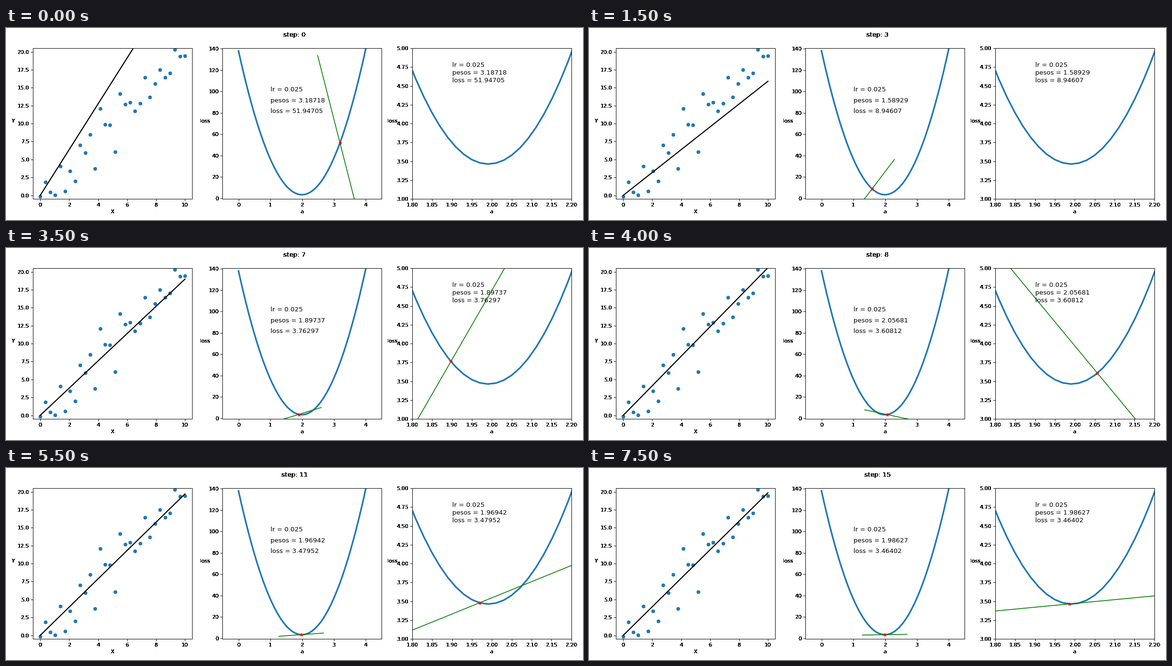
Animation, 1200 px wide and 400 px high, one loop 8000 ms. Source, as a matplotlib script:

```python
import matplotlib.pyplot as plt
import numpy as np
from matplotlib.animation import FuncAnimation

W, H, DPI = 1200, 400, 80
STEPS, INTERVAL = 16, 500

# One-weight linear regression: loss(a) = BASE + CURV * (a - BEST)^2
LR = 0.025
X = np.linspace(0, 10, 30)
Y = np.array([
    -0.17, 1.87, 0.43, 0.03, 4.04, 0.56, 3.37, 1.97, 6.98, 5.91,
    8.46, 3.70, 12.07, 9.86, 9.79, 6.05, 14.14, 12.67, 12.97, 11.73,
    12.80, 16.41, 13.67, 15.54, 17.48, 16.41, 17.02, 20.29, 19.36, 19.42,
])
CURV = np.mean(X ** 2)
BEST, BASE = 1.9914115, 3.463119
START = 1.19576965            # distance from the optimum at step 0
RATE = 1 - 2 * LR * CURV      # factor on that distance per step
REACH = 0.7                   # half width of the tangent


def loss(a):
    return BASE + CURV * (a - BEST) ** 2


def state(step):
    """Weight, loss and the gradient that led to this weight."""
    dist = START * RATE ** step
    a = BEST + dist
    return a, loss(a), 2 * CURV * dist / RATE


def solid_black(image, dpi):
    """Turn every visibly covered pixel into opaque black."""
    out = np.zeros_like(image)
    out[..., 3] = image[..., 3] > 0.12
    return out, 0, 0


def make_axes(left, xlim, ylim, xticks, yticks, xlabel, ylabel):
    ax = fig.add_axes([left / W, 43.9 / H, 331 / W, 314 / H])
    ax.set(xlim=xlim, ylim=ylim, xticks=xticks, yticks=yticks)
    ax.set_xlabel(xlabel)
    ax.set_ylabel(ylabel, rotation=0, labelpad=7.5)
    for part in (ax.xaxis, ax.yaxis, *ax.spines.values()):
        part.set_agg_filter(solid_black)
    return ax


class LossView:
    """Loss curve with its moving tangent, marker and readout."""

    def __init__(self, ax, x, y, gap):
        grid = np.linspace(0, 4, 200)
        ax.plot(grid, loss(grid), lw=3)
        self.tangent, = ax.plot([], [], color="green")
        self.star, = ax.plot([], [], "r*")
        self.texts = [ax.text(x, y - i * gap, "", fontsize=12) for i in range(3)]

    def update(self, a, value, slope):
        ends = np.array([-REACH, REACH])
        self.tangent.set_data(a + ends, value + slope * ends)
        self.star.set_data([a], [value])
        lines = f"lr = {LR}", f"pesos = {a:.5f}", f"loss = {value:.5f}"
        for text, line in zip(self.texts, lines):
            text.set_text(line)


plt.rcParams["font.family"] = "DejaVu Sans"
fig = plt.figure(figsize=(W / DPI, H / DPI), dpi=DPI, facecolor="white")
title = fig.suptitle("step: 0")
title.set_agg_filter(solid_black)

fit_ax = make_axes(56.15, (-0.5, 10.5), (-0.5, 20.5),
                   np.arange(0, 11, 2), np.arange(0, 20.1, 2.5), "X", "Y")
full_ax = make_axes(450.45, (-0.5, 4.5), (-0.5, 140.5),
                    np.arange(5), np.arange(0, 141, 20), "a", "loss")
zoom_ax = make_axes(844.75, (1.8, 2.2), (3, 5),
                    np.linspace(1.8, 2.2, 9), np.linspace(3, 5, 9), "a", "loss")

fit_ax.plot(X, Y, "o")
fit_line, = fit_ax.plot([], [], "k", lw=2)
views = [LossView(full_ax, 1, 100, 10), LossView(zoom_ax, 1.9, 4.75, 0.1)]


def update(step):
    a, value, slope = state(step)
    title.set_text(f"step: {step}")
    fit_line.set_data(X, a * X)
    for view in views:
        view.update(a, value, slope)
    return []


anim = FuncAnimation(fig, update, frames=STEPS, interval=INTERVAL,
                     repeat=True, repeat_delay=0, blit=False)
plt.show()
```
